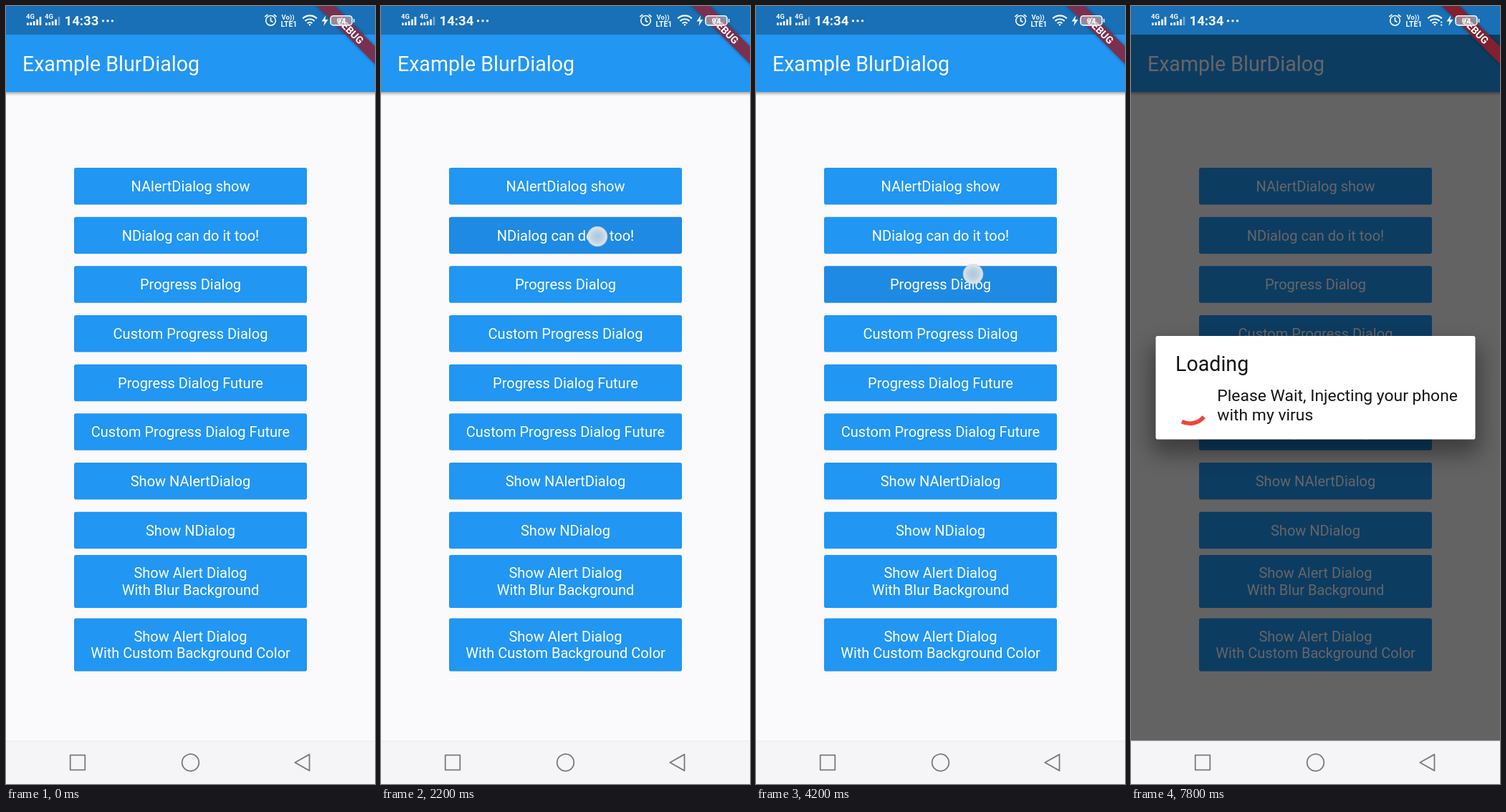
An HTML page for the animation above (8 s loop, 515x1087 px).

```html
<!DOCTYPE html>
<html lang="en">
<head>
<meta charset="utf-8">
<title>Dialog demo</title>
<style>
  html, body { margin: 0; width: 100%; height: 100%; overflow: hidden; background: #faf9fc; }
  svg { display: block; position: absolute; left: 0; top: 0; }
  text { font-family: Roboto, sans-serif; white-space: pre; }
  .label { font-size: 20.03px; fill: #fff; text-anchor: middle; }
  .title { font-size: 28.6px; fill: #141414; }
  .body { font-size: 22.9px; fill: #141414; }
  .status { fill: #f4f8fc; font-weight: 700; }
  .line { fill: none; stroke: #f4f8fc; }
  .nav { fill: none; stroke: #7a797b; stroke-width: 1.8; stroke-linejoin: round; }
  .shadow { filter: blur(15px); }
  .bar-shadow { filter: blur(2px); }
</style>
</head>
<body>
<svg width="515" height="1087" viewBox="0 0 515 1087">
  <defs>
    <radialGradient id="dot">
      <stop offset="0" stop-color="#a9c8de"/>
      <stop offset=".55" stop-color="#bfd4e2"/>
      <stop offset=".88" stop-color="#dbe3e8"/>
      <stop offset="1" stop-color="#d8cfc8" stop-opacity=".75"/>
    </radialGradient>
  </defs>

  <g id="app">
    <rect x="-20" y="-20" width="555" height="1127" fill="#faf9fc"/>
    <rect class="bar-shadow" x="-20" y="60" width="555" height="62" opacity=".4"/>
    <rect x="-20" y="-20" width="555" height="140" fill="#2196f3"/>
    <text x="22.9" y="91" font-size="28.6" fill="#fff">Example BlurDialog</text>
    <g id="buttons"></g>
  </g>

  <rect id="barrier" y="40" width="515" height="987"/>

  <g id="alert">
    <rect class="shadow" x="55" y="492" width="405" height="118" rx="12" opacity=".38"/>
    <rect x="63" y="478.5" width="389" height="110" rx="5.7" fill="#fff"/>
    <text class="title" x="84.5" y="520.7">Test</text>
    <text class="body" x="84" y="561.5">Iya iya</text>
  </g>

  <g id="progress">
    <rect class="shadow" x="28" y="474" width="459" height="152" rx="12" opacity=".38"/>
    <rect x="34.5" y="461" width="446" height="144.5" rx="2.8" fill="#fff"/>
    <text class="title" x="62" y="510.3">Loading</text>
    <path id="arc" fill="none" stroke="#f44336" stroke-width="5.7"/>
    <text class="body" x="120.3" y="551.5">Please Wait, Injecting your phone</text>
    <text class="body" x="120.3" y="578.6">with my virus</text>
  </g>

  <rect width="515" height="40" fill="#1970b6"/>
  <rect id="scrim" width="515" height="40" opacity=".5"/>

  <g transform="translate(515 0) rotate(45)">
    <rect class="bar-shadow" x="-80" y="40" width="160" height="17.2" opacity=".4"/>
    <rect id="ribbon" x="-80" y="40" width="160" height="17.2"/>
    <text y="53.8" font-size="14.2" font-weight="700" fill="#fff" text-anchor="middle">DEBUG</text>
  </g>

  <g id="signal"></g>
  <text id="clock" class="status" x="81.5" y="27.3" font-size="18.6"></text>
  <g fill="#f4f8fc">
    <circle cx="135.5" cy="20.7" r="1.7"/>
    <circle cx="142" cy="20.7" r="1.7"/>
    <circle cx="148.5" cy="20.7" r="1.7"/>
    <path d="M446.5 13l-6 8.6h4l-1.2 6.4 6.2-9h-4.2z"/>
  </g>
  <g id="alarm" class="line" stroke-width="1.7">
    <circle cx="369.5" cy="20.3" r="6.8"/>
    <path d="M369.5 16v4.7l3 1.8M361.3 15.2l4-3.4M377.7 15.2l-4-3.4"/>
  </g>
  <text class="status" x="384.5" y="19.2" font-size="9.5">Vo))</text>
  <text class="status" x="383.5" y="29" font-size="10.4">LTE1</text>
  <g class="line" stroke-width="2.2">
    <path d="M414.2 17.4a14 14 0 0 1 19.6 0M417.4 20.9a9.5 9.5 0 0 1 13.2 0M420.6 24.2a5 5 0 0 1 6.8 0"/>
    <circle cx="424" cy="26.3" r="1.2" fill="#f4f8fc" stroke="none"/>
  </g>
  <g id="traffic" fill="#f4f8fc">
    <circle cx="433.2" cy="22.6" r="1.2"/>
    <circle cx="433.2" cy="26.6" r="1.2"/>
  </g>
  <rect x="453" y="13.7" width="30" height="13.2" rx="4" fill="#b5b0b9" fill-opacity=".65" stroke="#f4f8fc" stroke-width="1.6"/>
  <path d="M485.6 18v5" class="line" stroke-width="1.6"/>
  <text class="status" x="468" y="24.5" font-size="11.5" text-anchor="middle">94</text>

  <rect y="1027" width="515" height="60" fill="#f5f4f6"/>
  <rect y="1026.5" width="515" height="1" fill="#ebeaec"/>
  <rect class="nav" x="89.7" y="1046.7" width="20.6" height="20.6"/>
  <circle class="nav" cx="257.5" cy="1057" r="11.8"/>
  <path class="nav" d="M403.3 1057L423.5 1045.6V1068.4Z"/>

  <circle id="touch" r="14.3" fill="url(#dot)"/>
</svg>
<script>
const LOOP = 8000, STEP = 200;
const $ = id => document.getElementById(id);

const labels = [
  'NAlertDialog show', 'NDialog can do it too!', 'Progress Dialog',
  'Custom Progress Dialog', 'Progress Dialog Future',
  'Custom Progress Dialog Future', 'Show NAlertDialog', 'Show NDialog',
  'Show Alert Dialog|With Blur Background',
  'Show Alert Dialog|With Custom Background Color'
];

const scenes = [
  { from: 600, to: 1800, box: 'alert', dim: .6, blur: 2.1 },
  { from: 2300, to: 3800, box: 'alert', dim: .54, blur: 0, full: true },
  { from: 4400, to: LOOP, box: 'progress', dim: .6, blur: 0 }
];

// Each touch lasts one step; button is the pressed row, if any.
const touches = [
  { at: 400, x: 302, y: 254, button: 0 },
  { at: 1600, x: 257.5, y: 405 },
  { at: 2200, x: 302, y: 322, button: 1 },
  { at: 3600, x: 257.5, y: 405 },
  { at: 4200, x: 303, y: 374.5, button: 2 }
];

function buildButtons() {
  $('buttons').innerHTML = labels.map((label, i) => {
    const lines = label.split('|'), two = lines.length > 1;
    const y = two ? 767 + (i - 8) * 88.6 : 226 + i * 68.67;
    const h = two ? 74 : 51.5;
    const base = y + (two ? 32.4 : 33);
    return `<rect x="95" y="${y}" width="325" height="${h}" rx="2.8" fill="#2196f3"/>` +
      lines.map((s, n) => `<text class="label" x="257.5" y="${base + n * 23.2}">${s}</text>`).join('');
  }).join('');
}

function buildSignal() {
  $('signal').innerHTML = [28, 54].map((x, n) => {
    let out = `<text class="status" x="${x}" y="18" font-size="9.4">4G</text>`;
    for (let i = 0; i < 5; i++) {
      const h = 3.6 + i * i * .48 + i * .15;
      const dim = n && i === 4 ? .4 : 1;
      out += `<rect x="${x + 1 + i * 4.4}" y="${27 - h}" width="2.7" height="${h}" fill="#f4f8fc" opacity="${dim}"/>`;
    }
    return out;
  }).join('');
}

// cubic-bezier(.4, 0, .2, 1) solved by bisection
function ease(x) {
  if (x <= 0) return 0;
  if (x >= 1) return 1;
  let lo = 0, hi = 1;
  for (let i = 0; i < 24; i++) {
    const s = (lo + hi) / 2, r = 1 - s;
    if (1.2 * r * r * s + .6 * r * s * s + s * s * s < x) lo = s; else hi = s;
  }
  return lo * lo * (3 - 2 * lo);
}

function drawArc(age) {
  const u = age / 1333 % 1, turn = age / 2222 % 1;
  const head = ease(u * 2), tail = ease(u * 2 - 1);
  const start = Math.PI * (-.5 + tail * 1.5 + turn * 2 + u * .5);
  const sweep = Math.max(Math.PI * 1.5 * (head - tail), .001);
  const at = a => `${82.1 + 25.9 * Math.cos(a)} ${557.3 + 25.9 * Math.sin(a)}`;
  $('arc').setAttribute('d',
    `M${at(start)}A25.9 25.9 0 ${sweep > Math.PI ? 1 : 0} 1 ${at(start + sweep)}`);
}

const show = (id, on) => { $(id).style.display = on ? '' : 'none'; };

function render(t) {
  const scene = scenes.find(s => t >= s.from && t < s.to);
  const touch = touches.find(p => p.at === t);

  for (const id of ['alert', 'progress']) show(id, scene && scene.box === id);
  show('barrier', scene);
  show('scrim', scene && scene.full && t >= 2400);
  $('ribbon').setAttribute('fill', scene ? '#81212f' : '#7a3150');

  let blur = 0;
  if (scene) {
    const age = t - scene.from;
    let extra = .247 * Math.exp(-age / 121);
    if (extra < .005) extra = 0;
    $(scene.box).setAttribute('transform',
      `translate(257.5 533.5) scale(${1 + extra}) translate(-257.5 -533.5)`);
    $('barrier').setAttribute('opacity', scene.dim);
    blur = scene.blur * Math.min(1, .4 + age / 400);
    if (scene.box === 'progress') drawArc(t - 4160);
  }
  $('app').style.filter = blur ? `blur(${blur}px)` : 'none';

  show('touch', touch);
  if (touch) $('touch').setAttribute('transform', `translate(${touch.x} ${touch.y})`);
  $('buttons').querySelectorAll('rect').forEach((r, i) =>
    r.setAttribute('fill', touch && touch.button === i ? '#1f8ae4' : '#2196f3'));

  $('clock').textContent = t < 1000 ? '14:33' : '14:34';
  const busy = t >= 2800 && t < 3600 || t >= 7800;
  show('traffic', busy);
  $('alarm').setAttribute('transform', `translate(${busy ? -1 : 0} 0)`);
}

buildButtons();
buildSignal();
const begin = performance.now();
let last = -1;
function tick() {
  const t = Math.floor((performance.now() - begin) % LOOP / STEP) * STEP;
  if (t !== last) render(last = t);
  requestAnimationFrame(tick);
}
tick();
</script>
</body>
</html>
```
